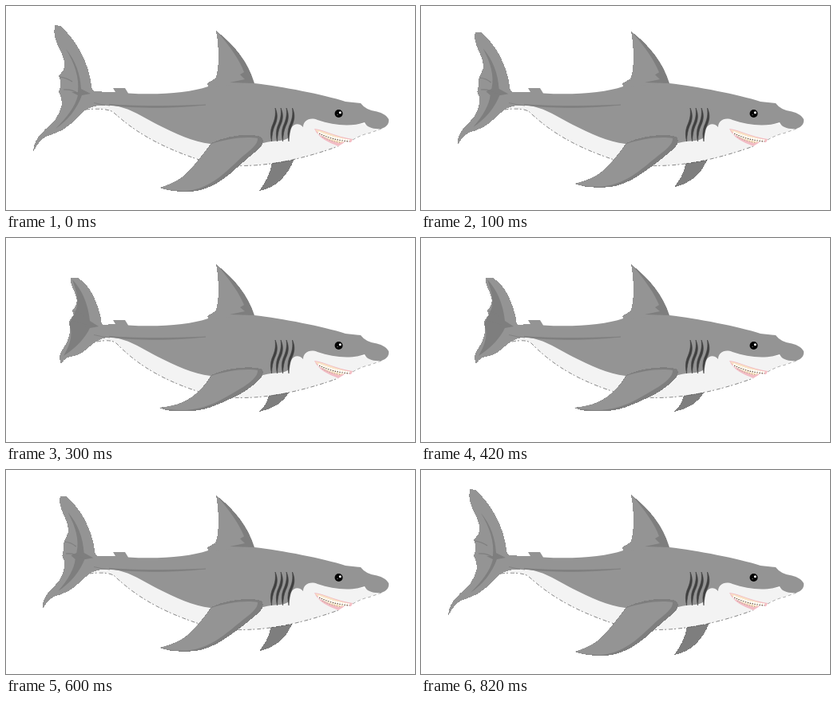
An HTML page for the animation above (900 ms loop, 512x256 px).

```html
<!DOCTYPE html>
<html lang="en">
<head>
<meta charset="utf-8">
<title>Swimming shark</title>
<style>
  html, body { margin: 0; width: 100%; height: 100%; overflow: hidden; background: #fff; }
  svg { display: block; width: 512px; height: 256px; }
  .skin { fill: #949494; }
  .shade { fill: #7e7e7e; }
  .white { fill: #f3f3f3; }
  .hull { shape-rendering: crispEdges; }
  .line { fill: none; stroke: #7e7e7e; }

  /* Each moving part bends from pose --a to pose --b and back in hard steps. */
  .bend { d: var(--a); animation: swim 900ms steps(3, end) infinite; }
  @keyframes swim {
    0%, 77.7777%, 100% { d: var(--a); }
    33.3333%, 44.4444% { d: var(--b); }
  }

  #belly {
    --a: path("M99 130 C108 127 126 128 134 133 C152 149 180 173 245 194 C295 208 355 198 416 176 L440 150 L360 130 L128 118 Z");
    --b: path("M113 130 C120 128 132 127 138 132 C152 146 180 174 245 194 C295 208 355 198 416 176 L440 150 L360 130 L128 118 Z");
  }
  #keel {
    --a: path("M100 130 C108 129 126 128 134 133 C152 149 180 173 245 194 C295 208 355 198 416 176");
    --b: path("M114 130 C120 129 132 127 138 132 C152 146 180 174 245 194 C295 208 355 198 416 176");
  }
  #tail {
    --a: path("M61 24 C58 36 64 48 68 56 C72 64 75 74 72 80 L66 88 C69 94 69 100 66 108 C73 118 70 130 62 142 C52 154 34 164 34 183 C40 172 46 163 58 161 C76 156 86 143 99 131 C106 126 116 124 129 124.5 L129 108 L110 107 C108 105 107 104 107 100 C104 72 88 42 68 25 Z");
    --b: path("M81 50 C79 58 87 68 88 74 C90 80 88 86 83 91 L85 97 C81 100 79 104 79 107 C82 114 79 126 75 133 C70 142 64 146 69 158 C74 150 78 149 86 148 C98 145 104 135 113 130 C118 127 122 125 129 125 L129 109.5 L122 109 C119 107 119 104 119 101 C114 80 106 60 90 50 Z");
  }
  #ridge {
    --a: path("M75 54 C87 68 93 86 94 104 L106 110 L95 112 C89 129 77 144 62 154 C76 140 87 126 90 112 L82 108 L90 108 C92 90 86 72 75 54 Z");
    --b: path("M83 52 C96 66 103 84 105 104 L116 111 L105 113 C100 124 88 138 72 148 C82 132 83 118 80 112 L80 106 L85 96 C92 84 90 72 83 52 Z");
  }
  #crease {
    --a: path("M67 89 Q76 90 83 95 M72 105 Q82 104 91 110");
    --b: path("M85 92 Q92 92 97 98 M81 105 Q92 104 103 111");
  }
  #dorsal {
    --a: path("M263 31 C268 55 266 85 262 91 L252 97 L254 103 L311 98 C303 70 285 48 263 31 Z");
    --b: path("M263 33 C268 56 266 86 262 92 L252 98 L254 103 L311 98 C303 72 285 50 263 33 Z");
  }
  #dorsalEdge {
    --a: path("M265 33 C281 51 293 69 298 83 L293 86 L299 92 L280 96 L311 97 C303 70 286 49 265 33 Z");
    --b: path("M265 35 C281 53 293 71 298 84 L293 87 L299 92 L280 96 L311 97 C303 72 286 51 265 35 Z");
  }
  #farFin {
    --a: path("M333 196 C331 212 323 223 317 232 C338 228 352 214 361 192 Z");
    --b: path("M329 198 C326 209 321 214 317 218 C335 214 347 207 355 193 Z");
  }
  #fin {
    --a: path("M257 172 C275 163 305 159 319 164 C324 167 322 174 317 179 C306 188 297 196 289 203 C272 219 251 234 224 233 C212 233 200 231 193 228 C208 223 220 217 228 208 C240 195 248 184 257 172 Z");
    --b: path("M257 172 C275 163 305 160 319 164 C324 167 322 173 316 179 C306 188 299 193 287 199 C267 208 250 218 226 217 C212 218 200 217 192 213 C210 211 222 207 232 200 C242 193 250 184 257 172 Z");
  }
  #finFace {
    --a: path("M257 173 C275 167 300 163 315 166 C316 173 306 181 297 188 C280 203 259 229 226 232 C212 232 200 231 193 228 C208 223 220 217 228 208 C240 195 248 184 257 173 Z");
    --b: path("M257 173 C275 167 300 163 315 166 C316 173 306 181 297 187 C278 198 256 214 226 216 C212 216 200 216 192 213 C210 211 222 207 232 200 C242 193 250 184 257 173 Z");
  }
</style>
</head>
<body>
<svg viewBox="0 0 512 256">
  <defs>
    <path id="gill" d="M337 128 C340.5 136 340 143 336 151 Q333 158 332.5 170 Q330 159 333 151 C337 142 338 136 337 128 Z"/>
  </defs>

  <path id="farFin" class="bend shade hull"/>
  <path id="belly" class="bend white hull"/>
  <path id="keel" class="bend" fill="none" stroke="#555" stroke-width=".7" stroke-dasharray="5 2 2 3"/>
  <path class="white hull" d="M380 135 L470 153 L455 159 Q445 161 434 168 L400 172 Z"/>
  <path d="M470 154 L455 159.5 Q445 161.5 434 168" fill="none" stroke="#777" stroke-width=".6" stroke-dasharray="4 3"/>

  <path id="dorsal" class="bend skin hull"/>
  <path class="skin" d="M128 124.5 C152 125 170 139 190 149 C212 160 235 171 257 173 L322 172 C336 168 348 171 354 165 C354 152 363 143 372 152 C372 144 380 139 390 143 C410 150 432 152 449 146 C451 152 460 155 470 154 C477 152 480 147 479 142 C476 136 468 133 462 132 Q450 130 444 122 L425 120 C398 111 345 101 311 97 L253 101 C230 109 190 112 153 109.5 L149 103 L134 103 L137 108 L128 108 Z"/>
  <path id="dorsalEdge" class="bend shade"/>
  <path class="shade" d="M107 121 C150 129 205 129 250 124 C205 126 150 127 107 121 Z" stroke="#7e7e7e" stroke-width=".6"/>

  <path id="tail" class="bend skin hull"/>
  <path id="ridge" class="bend shade"/>
  <path id="crease" class="bend line" stroke-width="1.1"/>
  <path class="line" d="M110 121.5 Q120 124 130 125" stroke-width=".8"/>

  <g fill="#404040" stroke="#404040" stroke-width=".6">
    <use href="#gill"/>
    <use href="#gill" x="7"/>
    <use href="#gill" x="14"/>
    <use href="#gill" x="21.5"/>
  </g>

  <path id="fin" class="bend shade hull"/>
  <path id="finFace" class="bend skin"/>

  <path d="M386 154 C398 155 412 164 434 167 L432 171 L424 171 L416 176 C404 171 391 166 386 154 Z" fill="#f2bcc4"/>
  <path d="M387 155 C400 157 412 164 432 168 L417 172 C404 168 393 163 387 155 Z" fill="#f9e3c4"/>
  <g fill="none">
    <path d="M391 159 Q408 167 430 169.5" stroke="#fff" stroke-width="4" stroke-dasharray="2.5 .7"/>
    <path d="M392 160 Q408 168 430 170" stroke="#5d5240" stroke-width="1.2" stroke-dasharray="1.4 1.6"/>
    <path d="M396 164 Q406 170 420 171.5" stroke="#8a7a5c" stroke-width=".8" stroke-dasharray="1 2.2"/>
  </g>

  <circle cx="416.5" cy="135" r="5"/>
  <circle cx="418.3" cy="133.8" r="1.5" fill="#fff"/>
  <circle cx="415" cy="136.5" r=".8" fill="#666"/>
</svg>
</body>
</html>
```
